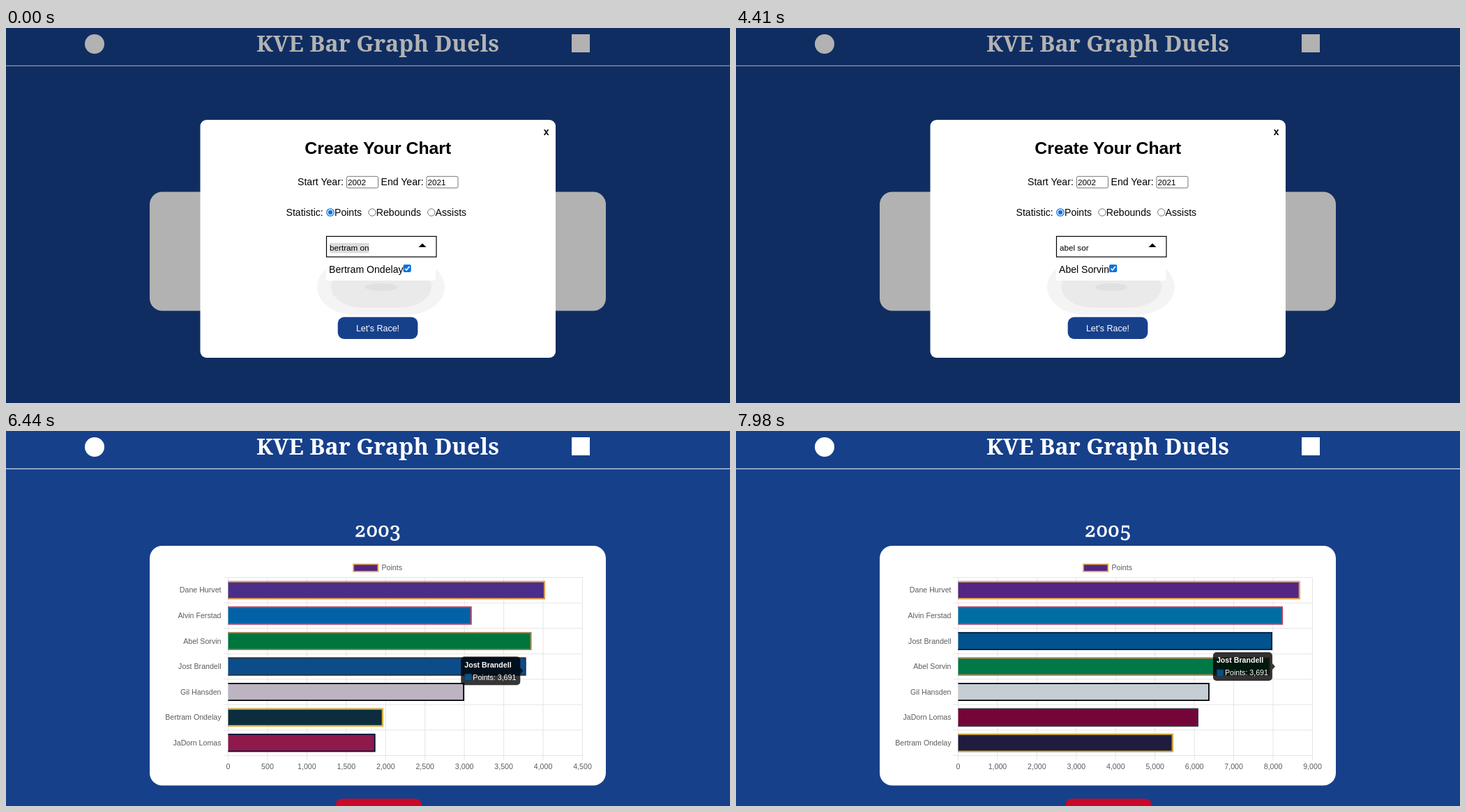
These frames come from a looping animation (1038x539 px, 8 s). An HTML page:

```html
<!DOCTYPE html>
<html lang="en">
<head>
<meta charset="utf-8">
<title>Bar chart duel</title>
<style>
  html, body { margin: 0; width: 100%; height: 100%; overflow: hidden; background: #17408b; }
  svg { display: block; width: 1038px; height: 539px; font-family: "Liberation Sans", Arial, sans-serif; }
  .serif { font-family: "Noto Serif", Georgia, serif; fill: #fff; text-anchor: middle; }
  .year { font-variant-numeric: oldstyle-nums; stroke: #fff; stroke-width: .5px; }
</style>
</head>
<body>
<svg id="stage" viewBox="0 0 1038 539"></svg>
<script>
const stage = document.getElementById("stage");
const LOOP = 8000, STEP = 70;
const SANS = '"Liberation Sans", Arial, sans-serif';
const pen = document.createElement("canvas").getContext("2d");

// ---- drawing helpers
const measure = (s, size) => {
  pen.font = `${size}px ${SANS}`;
  return pen.measureText(s).width;
};
const rect = (x, y, w, h, fill, r = 0, more = "") =>
  `<rect x="${x}" y="${y}" width="${w}" height="${h}" rx="${r}" fill="${fill}" ${more}/>`;
const text = (x, y, s, size, more = "") =>
  `<text x="${x}" y="${y}" font-size="${size}" ${more}>${s}</text>`;
const path = (d, more = "") => `<path d="${d}" ${more}/>`;
const stroke = (color, width = 1) => `stroke="${color}" stroke-width="${width}"`;

// ---- chart data: label, fill, border, points per season
const players = [
  ["Alvin Ferstad",   "#006bb6", "#c8305f", [2262, 1266, 2302, 2377]],
  ["Bertram Ondelay", "#0d2240", "#ffc627", [0, 1725, 1558, 2122]],
  ["Jost Brandell",   "#00538c", "#0a2142", [2011, 1680, 2032, 2151]],
  ["Dane Hurvet",     "#552583", "#f0b04a", [2461, 1557, 1819, 2832]],
  ["JaDorn Lomas",    "#860038", "#041e42", [0, 1654, 2175, 2478]],
  ["Abel Sorvin",     "#007a33", "#ba9653", [2048, 1836, 1769, 2116]],
  ["Gil Hansden",     "#c4ced4", "#000000", [1884, 1538, 1342, 1485]]
].map(([name, fill, line, pts]) => ({
  name, fill, line, total: y => pts.slice(0, y + 1).reduce((a, b) => a + b, 0)
}));
const axes = [[2500, 500], [4500, 500], [6000, 1000], [9000, 1000]];

// each season is ranked by the standings before it
const ranks = axes.map((_, y) =>
  y ? [...players].sort((a, b) => b.total(y - 1) - a.total(y - 1)) : players);

const LEFT = 318.5, RIGHT = 826.5, TOP = 210.5, BOTTOM = 466.5;
const ROW = (BOTTOM - TOP) / 7, BAR = 26;
const CHART_AT = 5248, SEASON = 785, GROW = 1000, OPEN_AT = 5180;

const outQuart = p => 1 - (1 - Math.min(1, Math.max(0, p))) ** 4;
const mix = (a, b, p) => a + (b - a) * p;
const rgb = hex => [1, 3, 5].map(i => parseInt(hex.slice(i, i + 2), 16));
const mixColor = (a, b, p) => {
  const to = rgb(b);
  return `rgb(${rgb(a).map((v, i) => Math.round(mix(v, to[i], p)))})`;
};

const season = t => Math.max(0, Math.min(3, Math.floor((t - CHART_AT) / SEASON)));
const progress = t => outQuart((t - CHART_AT - season(t) * SEASON) / GROW);
const fullWidth = (y, i) =>
  y < 0 ? 0 : ranks[y][i].total(y) / axes[y][0] * (RIGHT - LEFT);
const barWidth = (t, i) => {
  const y = season(t);
  return mix(fullWidth(y - 1, i), fullWidth(y, i), progress(t));
};

function header() {
  return rect(0, 0, 1038, 539, "#17408b") +
    `<circle cx="127" cy="23" r="14" fill="#fff"/>` +
    rect(811, 9, 26, 26, "#fff") +
    text(533, 34, "KVE Bar Graph Duels", 32.6, 'class="serif" font-weight="700"') +
    rect(0, 53.8, 1038, 1, "#fff");
}

function bar(t, i) {
  const y = season(t), p = progress(t), w = barWidth(t, i);
  if (w < 1) return "";
  const now = ranks[y][i], was = y ? ranks[y - 1][i] : now;
  const top = TOP + ROW * (i + 0.5) - BAR / 2, end = LEFT + w;
  return rect(LEFT, top, w, BAR, mixColor(was.fill, now.fill, p)) +
    path(`M${LEFT} ${top + 0.9}H${end - 0.9}V${top + BAR - 0.9}H${LEFT}`,
      `fill="none" ${stroke(mixColor(was.line, now.line, p), 1.8)}`);
}

// slides in from the row below, then trails the end of the fourth bar
function tooltip(t) {
  const start = 6297, lag = 110;
  if (t < start) return "";
  const p = outQuart((t - start) / 400);
  const tip = mix(672, LEFT + barWidth(t - lag, 3), p), mid = mix(375, 338.5, p);
  const x = tip - 89, y = mid - 20.5;
  return `<g opacity="${Math.min(1, (t - start) / 145)}">` +
    rect(x, y, 85, 41, "#000", 5, 'fill-opacity=".8"') +
    path(`M${tip - 4} ${mid - 4.5}L${tip} ${mid}L${tip - 4} ${mid + 4.5}Z`, 'fill-opacity=".8"') +
    text(x + 5, y + 15.3, "Jost Brandell", 10.64, 'font-weight="700" fill="#fff"') +
    rect(x + 5.5, y + 25, 9.5, 9.5, "#00538c", 0, stroke("#17345c", 0.9)) +
    text(x + 17, y + 33.4, "Points: 3,691", 10.64, 'fill="#fff"') + "</g>";
}

function chart(t) {
  const y = season(t), [max, step] = axes[y], lead = ranks[y][0];
  const label = (x, base, s, anchor) =>
    text(x, base, s, 10.64, `fill="#5c5c5c" text-anchor="${anchor}"`);
  let out = text(533, 152, 2002 + y, 29, 'class="serif year"') +
    rect(206, 165, 654, 344.5, "#fff", 18) +
    rect(472.5, 528.5, 123.5, 30, "#c9082a", 9) +
    rect(498, 191.4, 35.4, 10.6, lead.fill, 0, stroke(lead.line, 1.8)) +
    label(538.5, 200.2, "Points", "start");
  let grid = "";
  for (let v = 0; v <= max; v += step) {
    const x = LEFT + v / max * (RIGHT - LEFT);
    grid += `M${x} ${TOP}V${BOTTOM + 7}`;
    out += label(x, 486.2, v.toLocaleString("en-US"), "middle");
  }
  for (let i = 0; i <= 7; i++) grid += `M${LEFT - 7} ${TOP + i * ROW}H${RIGHT}`;
  out += path(grid, `fill="none" ${stroke("#e5e5e5")}`);
  ranks[y].forEach((pl, i) => {
    out += label(308.5, TOP + ROW * (i + 0.5) + 3.6, pl.name, "end") + bar(t, i);
  });
  return out + tooltip(t);
}

// ---- form
const typing = [
  [0, "bertram on"], [2170, "a"], [2310, "ab"], [2380, "abe"], [2450, "abel"],
  [2590, "abel "], [2800, "abel s"], [2940, "abel so"], [3080, "abel sor"]
];
const abels = ["Cusin", "Hendor", "Hurst", "Landerman", "Mattler", "Sorvin", "Vaun", "Whitlow"]
  .map(s => "Abel " + s);
const firstHits = ["Adan Brull", "Alec Tormund", "Anso Field", "Arlo Vinterby", "Axel Dornick",
  ...abels.slice(0, 3)];

function checkbox(x, y, on) {
  const s = 10.4;
  return on
    ? rect(x, y, s + 0.8, s + 0.8, "#0b72e0", 2) +
      path(`M${x + 2.4} ${y + 5.8}l2.3 2.4 4.2-5.3`, `fill="none" ${stroke("#fff", 1.6)}`)
    : rect(x + 0.6, y + 0.5, s, s, "#fff", 2, stroke("#767676"));
}

function option(name, base, on, hover) {
  return (hover ? rect(459, base - 17.8, 157, 24.7, "#e8fbff") : "") +
    text(463, base, name, 14.1) +
    checkbox(463 + measure(name, 14.1), base - 11.6, on);
}

function radio(x, y, on) {
  const color = on ? "#0b72e0" : "#767676";
  return `<circle cx="${x}" cy="${y}" r="5.2" fill="#fff" ${stroke(color, on ? 1.3 : 1)}/>` +
    (on ? `<circle cx="${x}" cy="${y}" r="3.2" fill="${color}"/>` : "");
}

// bands of the soft shadow under the menu: left, top, right, bottom, radius
function shadow(long) {
  const bands = long
    ? [[431, 243, 643, 497, 75], [444, 255, 630, 480, 62], [458, 268, 616, 464, 48], [476, 286, 598, 446, 30]]
    : [[446, 332, 629, 412.5, 55], [466, 342, 610, 402, 46], [515, 367, 561, 378, 23]];
  return bands.map(([x, y, x2, y2, r]) =>
    rect(x, y, x2 - x, y2 - y, "#000", r, `ry="${Math.min(r, (y2 - y) / 2)}" fill-opacity=".042"`)).join("");
}

function menu(t, long) {
  if (!long) {
    const first = t < 2170;
    return rect(459, 330, 157, 33, "#fff") +
      option(first ? "Bertram Ondelay" : "Abel Sorvin", 351.5, first || t >= 3920, t >= 3570 && t < 4410);
  }
  const names = t < 2310 ? firstHits : abels;
  return `<clipPath id="list"><rect x="459" y="241" width="157" height="185"/></clipPath>` +
    `<g clip-path="url(#list)">` + rect(459, 241, 157, 185, "#fff") +
    names.map((n, i) => option(n, 262.4 + i * 24.8, false, i === 3)).join("") + "</g>";
}

function field(t, y) {
  const typed = typing.filter(k => k[0] <= t).pop()[1];
  const w = measure(typed, 11.7), x = 464;
  return rect(459.5, y + 0.5, 157.5, 29.5, "#fff", 0, stroke("#000", 1.2)) +
    (t < 2170 ? rect(x, y + 10, w, 14.5, t < 980 ? "#dcdcdc" : "#b4d5fe") : "") +
    text(x, y + 21.3, typed, 11.7) +
    (t >= 2170 && t < 3570 ? rect(x + w, y + 10, 1, 14, "#000") : "") +
    path(`M591.5 ${y + 16}h11l-5.5-5.5z`);
}

function form(t) {
  const long = t >= 2170 && t < 2800;
  const [head, years, stat, input, button] = long ? [170, 189, 207, 210, 426.3] : [181, 226, 270, 299, 415.5];
  const yearBox = (x, v) =>
    rect(x + 0.5, years - 12.7, 45, 16.6, "#fff", 2, stroke("#767676")) + text(x + 2, years, v, 11.7);
  return rect(206, 235.5, 654, 171, "#fff", 18) +
    rect(0, 0, 1038, 539, "#000", 0, 'fill-opacity=".3"') +
    rect(278.5, 132, 509.5, 342, "#fff", 9) +
    text(774.7, 153.8, "x", 14, 'font-weight="700" text-anchor="middle"') +
    text(533.3, head, "Create Your Chart", 24.8, 'font-weight="700" text-anchor="middle"') +
    text(418, years, "Start Year:", 14.1) + yearBox(488, 2002) +
    text(537.5, years, "End Year:", 14.1) + yearBox(602.5, 2021) +
    text(401.5, stat, "Statistic:", 14.1) +
    radio(465, stat - 5, true) + text(471, stat, "Points", 14.1) +
    radio(525, stat - 5) + text(530.8, stat, "Rebounds", 14.1) +
    radio(609.8, stat - 5) + text(615.5, stat, "Assists", 14.1) +
    rect(475.7, button, 114.7, 31.5, "#17408b", 9) +
    text(533, button + 20.3, "Let's Race!", 12.5, 'fill="#fff" text-anchor="middle"') +
    shadow(long) + field(t, input) + menu(t, long);
}

// ---- clock
const begin = performance.now();
let shown = -1;
function tick() {
  const t = Math.floor((performance.now() - begin) % LOOP / STEP) * STEP;
  if (t !== shown) {
    shown = t;
    stage.innerHTML = header() + (t < OPEN_AT ? form(t) : chart(t));
  }
  requestAnimationFrame(tick);
}
tick();
</script>
</body>
</html>
```
